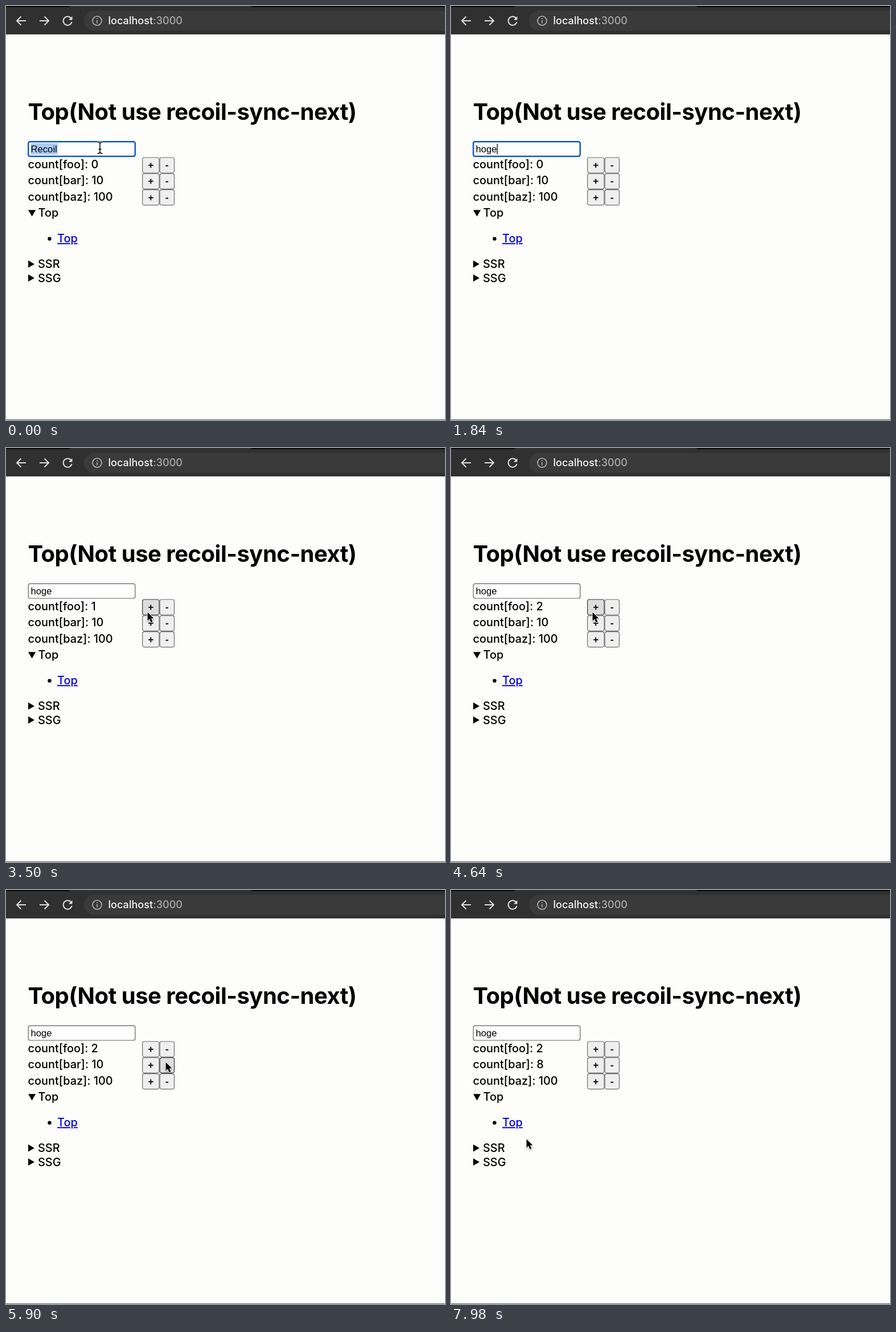
These frames come from a looping animation (771 by 727 pixels, 8000 ms). An HTML page:

```html
<!DOCTYPE html>
<html lang="en">
<head>
<meta charset="utf-8">
<title>Top</title>
<style>
  html, body { margin: 0; width: 100%; height: 100%; overflow: hidden; background: #fdfdfc; }
  svg { display: block; width: 771px; height: 727px; }
  text { font: 450 19.9px Inter, sans-serif; fill: #000; white-space: pre; }
  .title { font-size: 40px; font-weight: 700; letter-spacing: -.5px; }
  .url { font-size: 18.1px; fill: #f6f6f6; }
  .url tspan { fill: #aaa; }
  .link { fill: #0000e0; text-decoration: underline; }
  .control { font: 16.67px "Liberation Sans", Arial, sans-serif; }
  .sign { text-anchor: middle; stroke: #000; stroke-width: .5; }
  .icon { fill: none; stroke: #dedede; stroke-width: 2; }
  .button { fill: #efefef; stroke: #6c6c6c; stroke-width: 1.2; }
  .button.hover { fill: #dedede; stroke: #333; }
  #field { fill: #fff; stroke: #606060; stroke-width: 1.2; }
  #field.focus { stroke: #0b57c6; stroke-width: 2.4; }
</style>
</head>
<body>
<svg viewBox="0 0 771 727">
  <defs>
    <filter id="shadow" x="-50%" y="-50%" width="200%" height="200%">
      <feDropShadow dx="0" dy="1.5" stdDeviation="1.2" flood-opacity=".35"/>
    </filter>
    <path id="beamShape" d="M-4.5 -10Q-.5 -10 0 -7.5Q.5 -10 4.5 -10M-4.5 10Q-.5 10 0 7.5Q.5 10 4.5 10M0 -8V8M-2.5 2.5H2.5"/>
  </defs>
  <rect width="771" height="727" fill="#fdfdfc"/>

  <rect width="771" height="50" fill="#303030"/>
  <rect y="49" width="771" height="1" fill="#484848"/>
  <path d="M0 0H115L109 2H0ZM428 0H771V2H434Z" fill="#080808"/>
  <path d="M771 8.5H154.5a17.5 17.5 0 0 0 0 35H771Z" fill="#3a3a3a"/>
  <g class="icon">
    <path d="M35 26H19.5M26.5 18.5L19 26L26.5 33.5"/>
    <path d="M59 26H74.5M67.5 18.5L75 26L67.5 33.5"/>
    <path d="M115 22.5A7.6 7.6 0 1 0 115.6 28"/>
    <path d="M116.5 18V24.5H110Z" fill="#dedede" stroke="none"/>
    <g stroke="#b5b5b5" stroke-width="1.6">
      <circle cx="160" cy="26" r="8"/>
      <path d="M160 25V30.5M160 21.5V23.3"/>
    </g>
  </g>
  <text class="url" x="179.5" y="32">localhost<tspan>:3000</tspan></text>

  <text class="title" x="38.5" y="200">Top(Not use recoil-sync-next)</text>

  <rect id="field" x="39.2" y="238.3" width="187.6" height="25.7" rx="3"/>
  <rect id="selection" x="43.5" y="241" width="47.5" height="20" fill="#abcdf7"/>
  <text id="value" class="control" x="43.5" y="257"></text>
  <rect id="caret" x="81" y="242" width="1.3" height="18.5"/>

  <g id="rows"></g>

  <path d="M39 358.3H52.2L45.6 369.5Z"/>
  <text x="56.5" y="370">Top</text>
  <circle cx="76.5" cy="408.8" r="3.2"/>
  <text class="link" x="90" y="415.3">Top</text>
  <path d="M39 446.8V459.6L50 453.2Z"/>
  <text x="56" y="460">SSR</text>
  <path d="M39 471.3V484.1L50 477.7Z"/>
  <text x="56" y="484.5">SSG</text>
  <rect y="725.7" width="771" height="1.3" fill="#808080"/>

  <g id="arrow" filter="url(#shadow)">
    <path transform="translate(.6 1.6) scale(.87)" d="M0 0V17L4 13.4L7 20.3L10.2 18.9L7.3 12.3H12.6Z" stroke="#fff" stroke-width="2" stroke-linejoin="round" paint-order="stroke"/>
  </g>
  <g id="beam" fill="none">
    <use href="#beamShape" stroke="#fff" stroke-width="3.5"/>
    <use href="#beamShape" stroke="#000" stroke-width="1.5"/>
  </g>
</svg>
<script>
const LOOP = 8000;
const $ = id => document.getElementById(id);

// [time, value]: each value holds until the next step
const steps = {
  value: [[0, 'Recoil'], [260, 'h'], [400, 'ho'], [540, 'hog'], [680, 'hoge']],
  foo: [[0, 0], [3500, 1], [4160, 2]],
  bar: [[0, 10], [6160, 9], [6600, 8]],
  baz: [[0, 100]],
  focus: [[0, true], [3440, false]],
  hover: [[0, ''], [2960, 'foo+'], [5140, ''], [5380, 'bar-'], [7200, '']],
  pointer: [[0, 'beam'], [260, ''], [2060, 'beam'], [2340, 'arrow']]
};

// [time, x, y] of the pointer's hot spot
const path = [
  [0, 165, 249], [2060, 165, 249], [2340, 203, 273], [2540, 229, 282],
  [3000, 248, 287], [4960, 248, 287], [5500, 280, 301], [6900, 280, 301],
  [7160, 263, 317], [7760, 132, 436], [8000, 132, 436]
];

const rows = ['foo', 'bar', 'baz'];
$('rows').innerHTML = rows.map((name, i) => {
  const y = 28.3 * i;
  const button = (sign, x, width) => `
    <rect class="button" id="${name}${sign}" x="${x}" y="${266 + y}" width="${width}" height="27" rx="3.5"/>
    <text class="control sign" x="${x + width / 2}" y="${285 + y}">${sign}</text>`;
  return `<text id="${name}" x="38.5" y="${285 + y}"></text>
    ${button('+', 239.7, 29.3)}${button('-', 270.2, 25.3)}`;
}).join('');
const buttons = document.querySelectorAll('.button');

const at = (name, time) => steps[name].findLast(([start]) => start <= time)[1];
const show = (id, visible) => $(id).style.display = visible ? '' : 'none';

function pointerAt(time) {
  const next = path.findIndex(([end]) => end > time);
  const [t0, x0, y0] = path[next - 1];
  const [t1, x1, y1] = path[next];
  const p = (time - t0) / (t1 - t0);
  const ease = p * p * (3 - 2 * p);
  return [x0 + (x1 - x0) * ease, y0 + (y1 - y0) * ease];
}

function render(time) {
  const value = at('value', time);
  const focus = at('focus', time);
  const selected = value === 'Recoil';
  const typing = time < 680;
  const blinkOn = typing || (time - 680) % 1000 < 500;

  $('value').textContent = value;
  $('field').classList.toggle('focus', focus);
  show('selection', selected);
  show('caret', focus && !selected && blinkOn);
  $('caret').setAttribute('x', 43.5 + value.length * 9.27);

  rows.forEach(name => $(name).textContent = `count[${name}]: ${at(name, time)}`);
  const hover = at('hover', time);
  buttons.forEach(button => button.classList.toggle('hover', button.id === hover));

  const pointer = at('pointer', time);
  const position = `translate(${pointerAt(time).join(' ')})`;
  ['arrow', 'beam'].forEach(id => {
    show(id, pointer === id);
    $(id).setAttribute('transform', position);
  });
}

const start = performance.now();
function tick() {
  render((performance.now() - start) % LOOP);
  requestAnimationFrame(tick);
}
tick();
</script>
</body>
</html>
```
